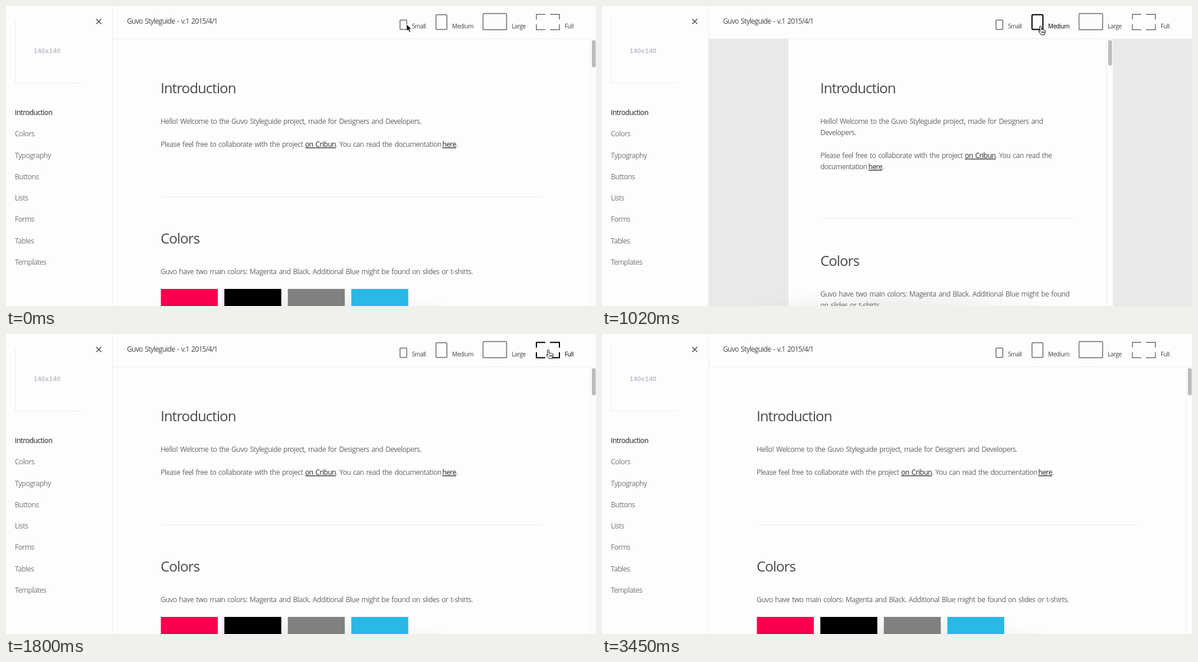
An HTML page for the animation above (3.48 s loop, 1000 by 509 pixels).

```html
<!DOCTYPE html>
<html lang="en">
<head>
<meta charset="utf-8">
<title>Styleguide viewport switcher</title>
<style>
  html, body { margin: 0; width: 100%; height: 100%; overflow: hidden; background: #fdfdfd; }
  svg { display: block; width: 1000px; height: 509px; }
  text { font-family: "Open Sans", "Noto Sans", sans-serif; fill: #666; white-space: pre; }
  .body { font-size: 12px; letter-spacing: -.49px; word-spacing: 1.25px; }
  .link { fill: #222; text-decoration: underline; }
  .head { font-size: 24px; letter-spacing: -.9px; fill: #484848; }
  .nav { font-size: 12px; letter-spacing: -.47px; fill: #757575; }
  .nav.on { fill: #1c1c1c; }
  .title { font-size: 12px; letter-spacing: -.68px; word-spacing: 1.25px; fill: #444; }
  .label { font-size: 10px; letter-spacing: -.4px; fill: #444; }
  .size { font: bold 11px "Liberation Sans", Arial, sans-serif; letter-spacing: .4px; fill: #bcbcca; }
  .icon { fill: none; stroke: #707070; stroke-width: 1.5; }
  .over .icon { stroke: #000; stroke-width: 2; }
  .over .label { fill: #000; }
  .line { fill: none; stroke: #ebebf5; }
</style>
</head>
<body>
<svg id="stage" viewBox="0 0 1000 509">
  <defs>
    <radialGradient id="shade">
      <stop offset="0" stop-color="#888" stop-opacity=".16"/>
      <stop offset="1" stop-color="#888" stop-opacity="0"/>
    </radialGradient>
  </defs>
</svg>
<script>
const NS = 'http://www.w3.org/2000/svg';
const LOOP = 3480;
const PAPER = '#fdfdfd', DESK = '#e9e9e9';
const stage = document.getElementById('stage');
const BRAND = 'Guvo', HOST = 'Cribun';

function add(parent, tag, attrs, str) {
  const el = document.createElementNS(NS, tag);
  for (const k in attrs) el.setAttribute(k, attrs[k]);
  if (str) el.textContent = str;
  parent.appendChild(el);
  return el;
}
const group = parent => add(parent, 'g', {});
const text = (parent, cls, x, y, str) => add(parent, 'text', { class: cls, x, y }, str);
const rect = (parent, x, y, width, height, fill, rx = 0) =>
  add(parent, 'rect', { x, y, width, height, fill, rx });
const line = (parent, d) => add(parent, 'path', { d, class: 'line' });

// Copy: each line is a baseline and its parts [offset, string, is link]
const hello = `Hello! Welcome to the ${BRAND} Styleguide project,`;
const please = 'Please feel free to collaborate with the project';
const palette = `${BRAND} have two main colors: Magenta and Black. Additional Blue might be found`;
const repo = `on ${HOST}`;
const wide = {
  lines: [
    [200, [0, hello + ' made for Designers and Developers.']],
    [239, [0, please], [245, repo, 1], [296.5, '. You can read the documentation'], [477.5, 'here', 1], [501, '.']],
    [455, [0, palette + ' on slides or t-shirts.']]
  ],
  rule: 323, colors: 403
};
const views = {
  full: { ...wide, x: 181, end: 990, text: 262, ruleEnd: 908, thumb: 46, swatch: [96.5, 107.6] },
  large: { ...wide, x: 201, end: 970, text: 278, ruleEnd: 893, thumb: 45, swatch: [91, 102.6] },
  medium: {
    x: 316, end: 855, text: 370, ruleEnd: 799, thumb: 43, rule: 360, colors: 441,
    lines: [
      [200, [0, hello + ' made for Designers and']],
      [219, [0, 'Developers.']],
      [258, [0, please], [245, repo, 1], [296.5, '. You can read the']],
      [277, [0, 'documentation'], [81.5, 'here', 1], [105, '.']],
      [493, [0, palette]],
      [512, [0, 'on slides or t-shirts.']]
    ]
  },
  small: {
    x: 425, end: 745, text: 458, ruleEnd: 714, thumb: 32, rule: 379, colors: 460, hbar: true,
    lines: [
      [200, [0, hello]],
      [219, [0, 'made for Designers and Developers.']],
      [258, [0, please]],
      [277, [0, repo, 1], [51.5, '. You can read the documentation']],
      [296, [0, 'here', 1], [23.5, '.']]
    ]
  }
};

function buildView(v) {
  const g = v.el = group(stage);
  rect(g, 181, 56, 819, 453, DESK);
  rect(g, v.x, 56, v.end + 11 - v.x, 453, PAPER);
  add(g, 'ellipse', { cx: 500, cy: 516, rx: 262, ry: 38, fill: 'url(#shade)' });
  text(g, 'head', v.text, 148, 'Introduction');
  text(g, 'head', v.text, v.colors, 'Colors');
  for (const [y, ...parts] of v.lines)
    for (const [dx, str, link] of parts)
      text(g, link ? 'body link' : 'body', v.text + dx, y, str);
  line(g, `M${v.text} ${v.rule}.5H${v.ruleEnd}`);
  if (v.swatch)
    ['#f9004f', '#000', '#808080', '#28b9e6'].forEach((c, i) =>
      rect(g, v.text + .5 + i * v.swatch[1], 480, v.swatch[0], 30, c));
  // Scrollbars
  line(g, `M${v.end + .5} 56V509`);
  rect(g, v.end + 3, 58, 6.5, v.thumb, '#bbb', 3);
  if (v.hbar) {
    line(g, `M${v.x} 500.5H${v.end}`);
    rect(g, v.x + 3, 503, 304, 6.5, '#b5b5b5', 3);
  }
}
Object.values(views).forEach(buildView);

// Sidebar and header
const frame = group(stage);
line(frame, 'M180.5 0V509M181 55.5H1000M15.5 22V130.5H126');
text(frame, 'size', 47, 80, '140x140');
add(frame, 'path', { d: 'M153 22l8.5 8.5m0 -8.5l-8.5 8.5', stroke: '#555', 'stroke-width': 1.6 });
['Introduction', 'Colors', 'Typography', 'Buttons', 'Lists', 'Forms', 'Tables', 'Templates']
  .forEach((s, i) => text(frame, i ? 'nav' : 'nav on', 15, 185 + i * 36.25, s));
text(frame, 'title', 205, 30, `${BRAND} Styleguide - v.1 2015/4/1`);

const items = [
  { name: 'Small', x: 667, end: 712, label: 688, box: [667.8, 23.8, 11.5, 16] },
  { name: 'Medium', x: 728, end: 792, label: 756, box: [728.8, 14.8, 18.5, 25] },
  { name: 'Large', x: 808, end: 883, label: 857, box: [808.5, 12.8, 40, 27.5] },
  { name: 'Full', x: 898, end: 962, label: 947 }
];
for (const it of items) {
  const g = it.el = group(stage);
  if (it.box) {
    const [x, y, width, height] = it.box;
    add(g, 'rect', { class: 'icon', x, y, width, height, rx: 1.8 });
  } else {
    add(g, 'path', {
      class: 'icon',
      d: 'M899 23V14.2H914M922 14.2H938V23M938 31V40.3H922M914 40.3H899V31'
    });
  }
  text(g, 'label', it.label, 38, it.name);
}

const cursor = group(stage);
const arrow = add(cursor, 'path', {
  d: 'M0 0V11.5L2.7 9.1L4.6 13.4L6.6 12.5L4.8 8.3H8.3Z',
  fill: '#000', stroke: '#fff', 'stroke-width': .8
});
const hand = add(cursor, 'path', {
  d: 'M-1.5 1Q-1.5 -1 0 -1Q1.3 -1 1.5 1L2 5Q3.5 4 4.5 5.3Q6 4.6 7 6Q8.5 5.6 8.7 7.5' +
     'L8 11L7 13V14H1.5L-2.5 9Q-3.8 7 -2.2 6.8L-.2 8ZM2.5 8V11M4.5 8V11M6.4 8V11',
  fill: '#fff', stroke: '#111', 'stroke-width': 1
});

const clicks = [[0, 'full'], [540, 'small'], [900, 'medium'], [1290, 'large'], [1650, 'full']];
const path = [
  [0, 679, 31], [150, 679, 31], [330, 684, 35], [630, 684, 35], [780, 743, 35], [1050, 743, 35],
  [1170, 828, 34], [1350, 828, 34], [1500, 917, 33], [1740, 917, 33], [2040, 935, -18], [LOOP, 935, -18]
];

function cursorAt(t) {
  const i = path.findIndex(p => p[0] > t);
  const [t0, x0, y0] = path[i - 1], [t1, x1, y1] = path[i];
  const u = (t - t0) / (t1 - t0), e = u * u * (3 - 2 * u);
  return [x0 + (x1 - x0) * e, y0 + (y1 - y0) * e];
}

function draw(t) {
  const view = clicks.filter(c => c[0] <= t).pop()[1];
  for (const k in views) views[k].el.style.display = k === view ? '' : 'none';

  const [x, y] = cursorAt(t);
  let hit = false;
  for (const it of items) {
    const over = t >= 210 && y > 12 && y < 42 && x >= it.x && x <= it.end;
    it.el.setAttribute('class', over ? 'over' : '');
    hit = hit || over;
  }
  cursor.setAttribute('transform', `translate(${x.toFixed(2)} ${y.toFixed(2)})`);
  arrow.style.display = hit ? 'none' : '';
  hand.style.display = hit ? '' : 'none';
}

let start = null;
function tick(now) {
  if (start === null) start = now;
  draw(Math.max(0, now - start) % LOOP);
  requestAnimationFrame(tick);
}
draw(0);
requestAnimationFrame(tick);
</script>
</body>
</html>
```
